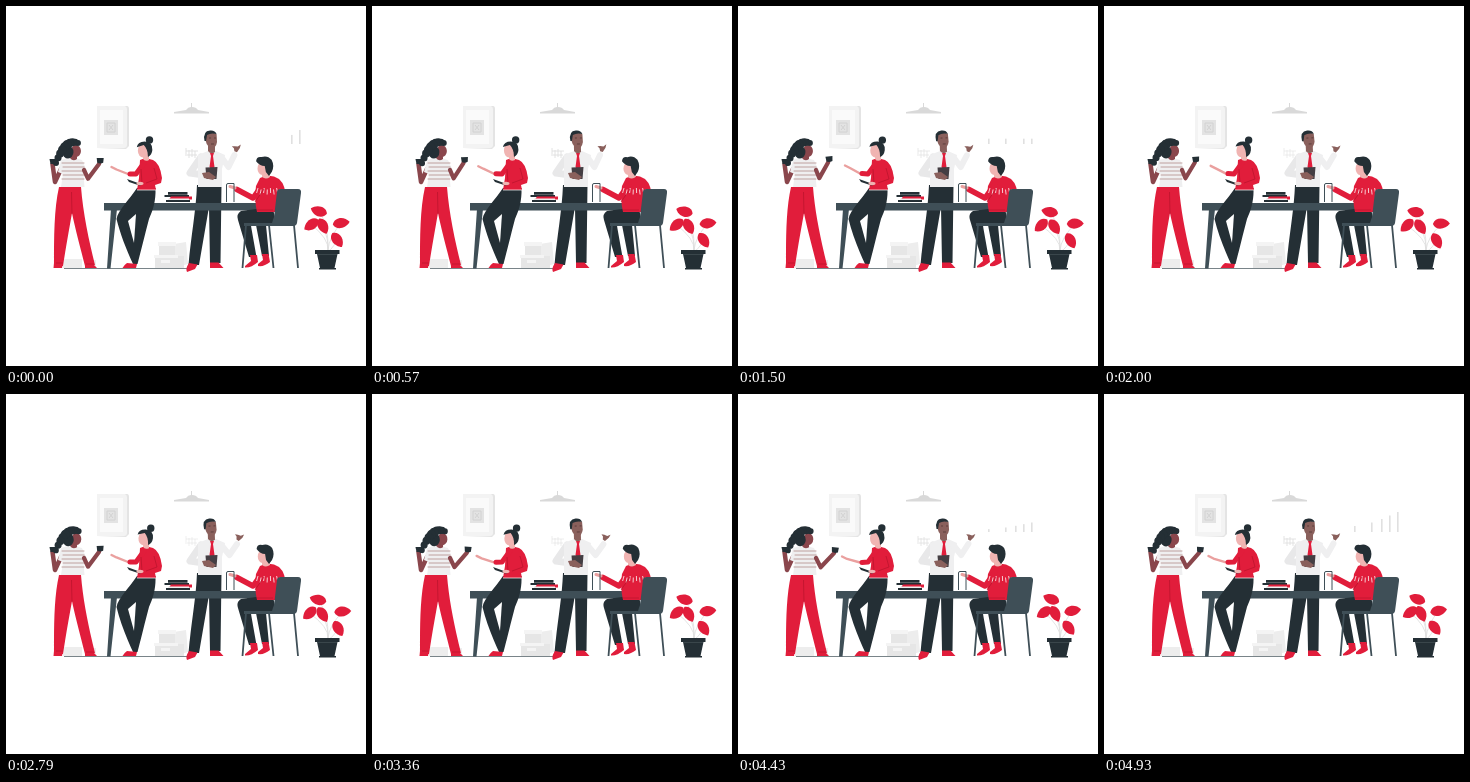
An HTML page that plays this animation: 360x360 px, repeating every 5000 ms.

```html
<!DOCTYPE html>
<html lang="en">
<head>
<meta charset="utf-8">
<title>Team meeting</title>
<style>
html, body { margin: 0; width: 100%; height: 100%; overflow: hidden; background: #fff; }
svg { display: block; width: 100vw; height: 100vh; }
.red { fill: #e11d3b; }
.ink { fill: #242f35; }
.steel { fill: #3f4f57; }
.brown { fill: #8a464c; }
.tan { fill: #8a605c; }
.pink { fill: #f0b4b2; }
.shirt { fill: #efeff0; }
.limb { fill: none; stroke-linecap: round; stroke-linejoin: round; }
.line { fill: none; stroke: #3f4f57; }
.fold { fill: none; stroke: #4b565c; stroke-width: .6; }
.seam { fill: none; stroke: #b8142c; stroke-width: .7; }
</style>
</head>
<body>
<svg viewBox="0 0 360 360">
  <!-- room -->
  <path fill="#e4e4e4" d="M91 100 H121 Q123 100 123 103 V140 L120 143 L91 142 Z"/>
  <path fill="#f3f3f3" d="M91 100 H119 Q121 101 121 103 V139 Q121 142 118 142 H91 Z"/>
  <path fill="#fafafa" d="M94 104 H117 V138 H94 Z"/>
  <path fill="#e3e3e3" d="M98 114 H112 V129 H98 Z"/>
  <path fill="none" stroke="#d2d2d2" d="M101 117 H109 V126 H101 Z M103 119 L107 124 M107 119 L103 124"/>
  <path fill="#d9d9d9" d="M185 97 H186 V101 Q190 101 192 104 L203 106 V107.500 H168 V106 L180 104 Q182 101 185 101 Z"/>
  <path fill="#ededed" d="M168 238 L180 236 L182 258 L168 262 Z M57 253 H76 V262 H57 Z M79 254 H90 V262 H79 Z"/>
  <path fill="#e6e6e6" d="M153 237 H169 V249 H153 Z M149 250 H178 V262 H149 Z"/>
  <path fill="#f4f4f4" d="M152 236 H170 V240 H152 Z M148 249 H172 V252 H148 Z M155 254 H164 V257 H155 Z"/>
  <g id="bars" fill="#e0e0e0"></g>
  <path id="notes" fill="none" stroke="#dcdcdc" d="M180 142 V150 M183 144 V152 M186 143 V151 M189 145 V152 M180 145 H192 M181 149 H191"/>
  <path class="line" stroke-width=".7" d="M58 262.500 H183"/>

  <!-- plant -->
  <g id="stems" class="limb" stroke="#dedede" stroke-width=".8"></g>
  <g id="leaves" class="red"></g>
  <path class="ink" d="M309 244 H333.500 V248 H331.500 L328.500 262 H330 V263.500 H313 V262 H314 L311 248 H309 Z"/>
  <path class="fold" d="M311 248.500 H331"/>

  <!-- woman with the cups -->
  <path class="red" d="M53 181 H75 C77 207 83 235 89 259 L79 260 C75 244 69 222 66 207 C63 224 60 240 57 260 H48 C48 231 48 203 53 181 Z"/>
  <path class="red" d="M48 257 H57 L56 262 H47.500 Z M79 258 H87 L91 262 H79 Z"/>
  <path class="seam" d="M65.500 186 L66 208 M50 257 H57 M80 258 H88"/>
  <path class="limb" stroke="#8a464c" stroke-width="4.500" d="M55 163 L49 176 L46.500 158"/>
  <path class="shirt" d="M55 154 L65 151 L76 154 L81 165 L77.500 168 L78.500 181 H55 L57 168 L52 166 Z"/>
  <path id="stripes" class="limb" stroke="#b79695" stroke-width=".9"/>
  <path id="armCup" class="limb" stroke="#8a464c" stroke-width="4.200"/>
  <path id="cup" class="ink" d="M-3.500 -2.800 H3.500 L3 2 Q0 3.500 -3 2 Z"/>
  <path class="ink" d="M43.500 153 H50.500 L49 158 H44.500 Z"/>
  <g id="head1">
    <path class="brown" d="M65 145 H71 V153 Q67 156 64 152 Z"/>
    <ellipse class="brown" cx="70" cy="145" rx="5" ry="6"/>
    <g id="curls" class="ink"><ellipse cx="62" cy="146" rx="5.500" ry="6.500"/></g>
  </g>

  <!-- standing man's legs, then the table in front -->
  <path class="ink" d="M191 179 H215.500 L214.500 257 H204 L203 201 L193 259 H182.500 C185 230 190 205 191 179 Z"/>
  <path class="red" d="M183 257 L191.500 258.500 L189 263 L181 266 Q179 263 183 257 Z M204 256.500 H212.500 L217.500 262 H204 Z"/>
  <path class="steel" d="M105 203 H111 L104.500 262.500 H101 Z M241 203 H246 L245 222 H242 Z"/>
  <path class="steel" d="M98 197 H270 V204.500 H98 Z"/>

  <!-- woman with the tablet -->
  <path class="ink" d="M131 182 H149.500 C150 195 147 204 143 213 C139 228 135 245 131.500 258 H127 C120 243 114 227 110.500 213 C112 204 124 193 131 182 Z"/>
  <path fill="#fff" d="M122 215 L130 208 L128 237 Z"/>
  <path class="red" d="M121 257 L131 258 L130 262 H116.500 Q118 259 121 257 Z"/>
  <path class="red" d="M134 154 Q139 151 147 154 Q154 157 156 172 L155 177 L149 179 L150 184 H131 L133 172 Z"/>
  <path id="handReach" class="limb" stroke="#eaa09f" stroke-width="2.400"/>
  <path id="armReach" class="limb" stroke="#e11d3b" stroke-width="5"/>
  <path class="ink" d="M121 173 L132 177 L135 180 L123 176 Z"/>
  <path class="seam" d="M135 163 L136 177 M148 162 L151 173 L140 177"/>
  <ellipse class="pink" cx="134" cy="177.500" rx="3.500" ry="1.700"/>
  <path fill="none" stroke="#fff" stroke-width=".7" d="M131 184 H150"/>
  <g id="head2">
    <path class="pink" d="M137 147 H143 V154 Q139 156 137 153 Z"/>
    <ellipse class="pink" cx="137" cy="144.500" rx="5" ry="7"/>
    <circle class="ink" cx="143.800" cy="134" r="3.700"/>
    <path class="ink" d="M131 141 Q132 135.500 139 135.500 Q147 136 146.500 144 Q146 149 142 151 Q142 143 138 139 Z"/>
  </g>

  <!-- books -->
  <path class="ink" d="M162 186 H181.500 V188.700 H162 Z M158.500 189 H183 V191 H158.500 Z M160 194 H184 V196 H160 Z"/>
  <path class="red" d="M165 190.500 H186 V193.500 H163 Z"/>
  <path fill="#eee" d="M162 192.500 H183 V194 H162 Z"/>

  <!-- standing man -->
  <path class="limb" stroke="#e8e8e9" stroke-width="7" d="M195 151 L184 167 L198 169"/>
  <path class="shirt" d="M192 149 L202 145 H210 L219 149 L216 163 V181 H192 Z"/>
  <path id="armTalk" class="limb" stroke="#efeff0" stroke-width="6"/>
  <path id="handTalk" class="tan" d="M-2.500 3 L-3 0 L-5 -2 L-2 -2 L1 -1.500 L4 -3.500 L3 0 L0 4 Z"/>
  <path class="red" d="M204 147 H208 L207 150 L208.500 161 L206 165 L203.500 161 L205 150 Z"/>
  <path fill="#443e43" d="M199.500 161.500 L211.500 161 L210.500 173 H200.500 Z"/>
  <path class="tan" d="M196 167 L203 166 L210 171 L207 174 L198 172 Z"/>
  <g id="head3">
    <path class="tan" d="M202 138 H209 V146 Q205 149 202 145 Z"/>
    <path class="tan" d="M199 129 Q204 125 210.500 128 L211 136 Q210 142 205.500 142.500 Q199 140 199 129 Z"/>
    <path class="ink" d="M198.500 135 Q196.500 125 204 124.500 Q209 124 210.500 128 Q205 126.500 201 129 L200 135 Z"/>
    <path fill="none" stroke="#4b302f" stroke-width=".7" d="M203 132 H205 M208 132 H210 M205 138 H208"/>
  </g>

  <!-- seated man -->
  <path class="ink" d="M267 203 H250 L235 205 Q230 208 232 214 L243 251 H250.500 L245 220 L250 219 L256 250 H263 L260 219 L270 216 Z"/>
  <path class="red" d="M244 249 H251 L252 256 Q245 262 239 261.500 V260 L245 255 Z M256 248 H262.500 L264 256 Q258 261 252 260 V258 L257 254 Z"/>
  <path class="red" d="M254 172 Q264 167 273 173 Q280 179 280 194 L269 206 H251 Q248 193 250 180 Z"/>
  <path class="limb" stroke="#e11d3b" stroke-width="5.500" d="M257 178 L247 192 L231 183.500"/>
  <path class="limb" stroke="#eaa09f" stroke-width="3" d="M229 182 L224 180.500"/>
  <path id="knit" stroke="#fbdde0" stroke-width=".9"/>
  <path class="seam" d="M258 183 L249 196 M251 204 H267"/>
  <g id="head4">
    <path class="pink" d="M256 164 H264 V171 Q260 174 256 171 Z"/>
    <ellipse class="pink" cx="256.500" cy="162.500" rx="4.800" ry="6.500"/>
    <path class="ink" d="M250.500 155 Q251 150 256 151 Q262 149 266 154 Q269 160 266 166 L263 170 L260 166 L259 160 Q254 160 250.500 155 Z"/>
  </g>
  <path class="line" d="M220.500 196 V179 Q220.500 177.500 222 177.500 H228 V196"/>

  <!-- chair -->
  <path class="steel" d="M271 186 Q271 183 275 183 H292 Q295.500 183 295 187 L291 217 Q290.500 220 287 220 H266 Q265 219 268 211 Z"/>
  <path class="steel" d="M238 217 H288 V220 H238 Z"/>
  <path class="line" stroke-width="1.800" d="M240 219 L236.500 262 M263 219 L267.500 262 M288 219 L292 262"/>
</svg>
<script>
const $ = id => document.getElementById(id);
const set = (el, attrs) => {
  for (const name in attrs) el.setAttribute(name, attrs[name]);
};
const repeat = (n, draw) => Array.from({ length: n }, (_, i) => draw(i)).join('');

const LOOP = 5000, STEP = LOOP / 70, PERIOD = 5600;

// The swing is longer than the loop, so each loop ends in a small cut.
const swing = (t, peak) => Math.cos((t - peak) / PERIOD * 2 * Math.PI);
const clamp = v => Math.max(0, Math.min(1, v));

// Hair follows a curve from the forehead to the back of the neck.
$('curls').innerHTML += repeat(10, i => {
  const p = i / 9, q = 1 - p;
  const x = 72 * q * q + 2 * 59 * p * q + 50 * p * p;
  const y = 137 * q * q + 2 * 132 * p * q + 157 * p * p;
  return `<circle cx="${x}" cy="${y}" r="${3 + 1.6 * Math.sin(p * Math.PI)}"/>`;
});
set($('stripes'), { d: repeat(5, i => `M${56 + i % 2} ${157 + i * 4} H78`) });
set($('knit'), { d: repeat(8, i => `M${252 + i * 3.1} ${182 + i % 2 * 1.5} l${i * .4 - 1.4} 5`) });

// Leaf centre and direction in degrees.
const leaves = [[313, 205, 200], [305.5, 218.5, 145], [317, 220, 65], [335, 217, -10], [331, 234, 55]];
const LEAF = 'M-8.500 0 C-6 -7 4 -7 8.500 0 C4 6 -6 7 -8.500 0 Z';
$('leaves').innerHTML = repeat(leaves.length, () => `<path d="${LEAF}"/>`);
$('stems').innerHTML = repeat(leaves.length, () => '<path/>');

const barX = [250, 267, 277, 285, 293];
$('bars').innerHTML = repeat(barX.length, i => `<rect x="${barX[i]}" width="1.600"/>`);

function drawPlant(t) {
  const open = .07 - .1 * swing(t, 4700);
  leaves.forEach(([x, y, angle], i) => {
    const lx = 321 + (x - 321) * (1 + open), ly = y + open * 5;
    const turn = angle + open * 50 * Math.sign(x - 321);
    set($('leaves').children[i], { transform: `translate(${lx} ${ly}) rotate(${turn})` });
    set($('stems').children[i], { d: `M322 244 Q323 ${ly + 14} ${lx} ${ly}` });
  });
}

function drawArms(t) {
  const s = swing(t, 4200), talk = swing(t, 3400);

  const cx = 94.2 + 3 * s, cy = 154.7 + 1.5 * s;
  set($('armCup'), { d: `M78 164 L${82 + s * .7} ${172.7 + s * .6} L${cx - 1} ${cy + 3}` });
  set($('cup'), { transform: `translate(${cx} ${cy}) rotate(${s * 6})` });

  const rx = 105.5 - 1.5 * s, ry = 161 + 1.5 * s, wrist = 168 + .5 * s;
  set($('armReach'), { d: `M138 157 L130 168 L124 ${wrist}` });
  set($('handReach'), { d: `M122 ${wrist} L${rx + 5} ${ry + 2.5} L${rx} ${ry}` });

  const tx = 232.2 + 1.7 * talk, ty = 142.6 + .6 * talk;
  set($('armTalk'), { d: `M216 152 L${223 + talk * .6} 161 L${tx - 2.5} ${ty + 7}` });
  set($('handTalk'), { transform: `translate(${tx} ${ty}) rotate(${5 + talk * 8})` });
}

function drawHeads(t) {
  const tilt = (id, angle, x, y) => set($(id), { transform: `rotate(${angle} ${x} ${y})` });
  tilt('head1', 1 + 2 * swing(t, 3600), 67, 153);
  tilt('head2', 1 + 2 * swing(t, 2600), 140, 153);
  tilt('head3', -1 - 1.500 * swing(t, 2200), 205, 146);
  tilt('head4', -.5 + 1.500 * swing(t, 3600), 260, 171);
}

// The chart clears from the left, blinks once, then grows again.
function drawWall(t) {
  const blink = 6 * clamp(1 - Math.abs(t - 1550) / 450);
  const grow = clamp((t - 4000) / 900);
  barX.forEach((_, i) => {
    const clear = clamp(.7 - (4 - i) * .15 - t / 500) * (i > 2);
    const h = Math.max(blink * (i !== 2), (6 + 3.5 * i) * Math.max(grow, clear));
    set($('bars').children[i], { y: 138 - h, height: h });
  });
  set($('notes'), { opacity: .65 + .2 * swing(t, 0) });
}

function render(now) {
  const t = Math.floor((now % LOOP) / STEP) * STEP;
  drawWall(t);
  drawPlant(t);
  drawArms(t);
  drawHeads(t);
}

const start = performance.now();
function tick() {
  render(performance.now() - start);
  requestAnimationFrame(tick);
}
tick();
</script>
</body>
</html>
```
